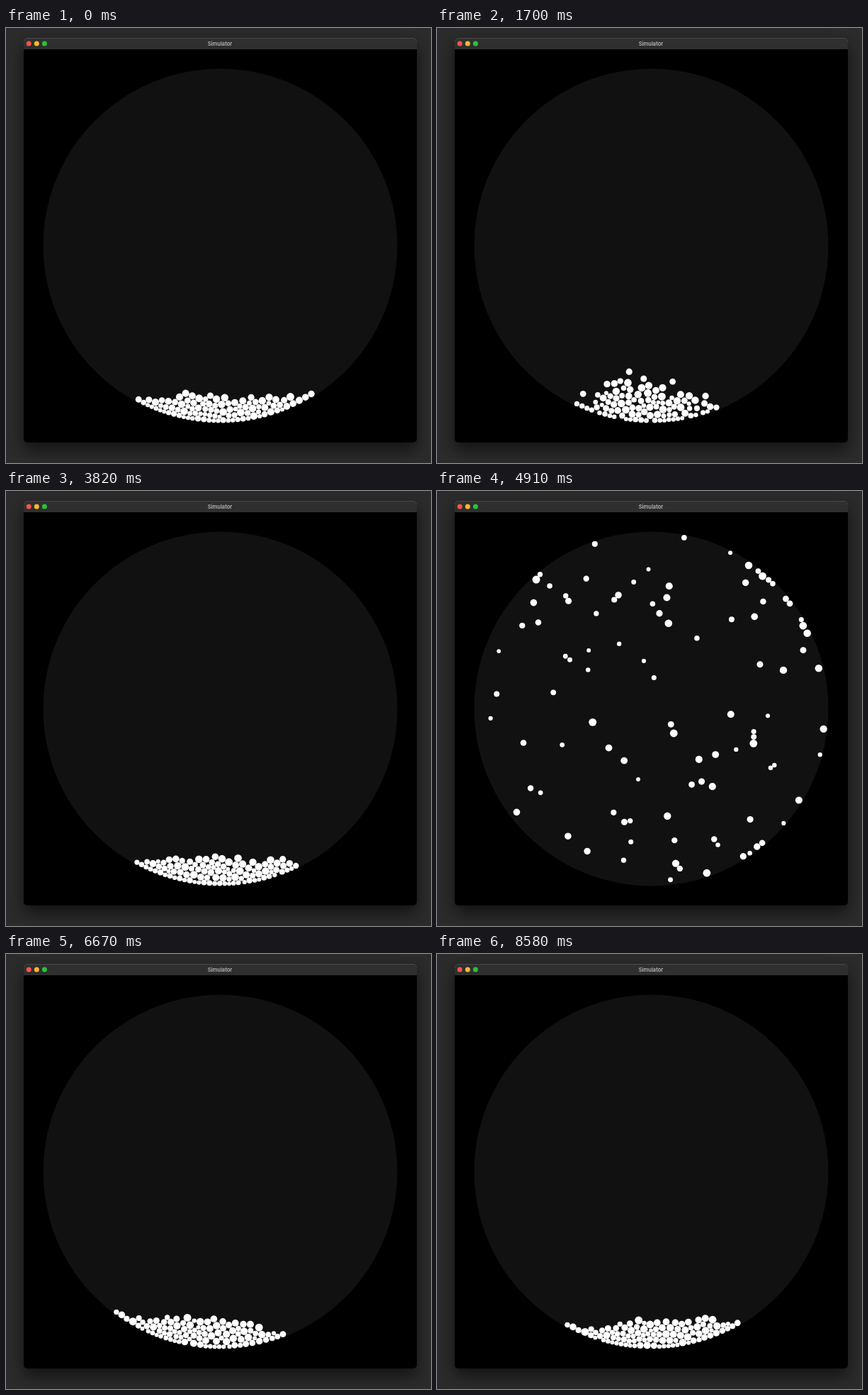
An HTML page for the animation above (8610 ms loop, 600 px wide and 614 px high).

```html
<!DOCTYPE html>
<html lang="en">
<head>
<meta charset="utf-8">
<title>Simulator</title>
<style>
  html, body { margin: 0; width: 100%; height: 100%; overflow: hidden; background: #2b2b2b; }
  svg { display: block; width: 100vw; height: 100vh; }
  text { font: 600 7.5px Inter, "Liberation Sans", sans-serif; fill: #b8b8b8; text-anchor: middle; }
</style>
</head>
<body>
<svg viewBox="0 0 600 614">
  <defs>
    <filter id="shadow" x="-10%" y="-10%" width="120%" height="120%">
      <feDropShadow dx="0" dy="10" stdDeviation="11" flood-color="#000" flood-opacity=".6"/>
    </filter>
  </defs>
  <rect width="600" height="614" fill="#2b2b2b"/>
  <rect x="25" y="14" width="555" height="571" rx="5" fill="#000" filter="url(#shadow)"/>
  <path d="M25 30V19a5 5 0 0 1 5-5H575a5 5 0 0 1 5 5V30Z" fill="#2f2f2f"/>
  <path d="M25.5 19a4.5 4.5 0 0 1 4.5-4.5H575a4.5 4.5 0 0 1 4.5 4.5" fill="none" stroke="#505050" stroke-width=".8"/>
  <circle cx="32.2" cy="22" r="3.5" fill="#f8544c"/>
  <circle cx="43.3" cy="22" r="3.5" fill="#fbb92f"/>
  <circle cx="54.4" cy="22" r="3.5" fill="#28c23c"/>
  <text x="302" y="24.6">Simulator</text>
  <circle cx="302.5" cy="307.5" r="250" fill="#111"/>
  <g id="balls" fill="#fff"></g>
</svg>
<script>
const LOOP = 8610, FRAMES = 284, FRAME = LOOP / FRAMES;
const SUBSTEPS = 16, DT = FRAME / 1000 / SUBSTEPS;
const CX = 302.5, CY = 307.5, R = 250;
const GRAVITY = 1150, DRAG = 0.9995;
const COUNT = 100, SPREAD = 530, KICK = 150;
const SETTLE_FRAMES = 130, FIRST_BURST = 23, SECOND_BURST = 162;

let seed = 20;
function random() {
  seed = (seed * 1664525 + 1013904223) % 4294967296;
  return seed / 4294967296;
}

const balls = Array.from({ length: COUNT }, (_, i) => ({
  r: 5.5 - 2.6 * i / (COUNT - 1), x: 0, y: 0, oldX: 0, oldY: 0
}));

function keepInside(ball) {
  const dx = ball.x - CX, dy = ball.y - CY;
  const dist = Math.hypot(dx, dy), limit = R - ball.r;
  if (dist <= limit) return;
  ball.x = CX + dx * limit / dist;
  ball.y = CY + dy * limit / dist;
}

function separate() {
  for (let i = 0; i < COUNT; i++) {
    const a = balls[i];
    for (let j = i + 1; j < COUNT; j++) {
      const b = balls[j], reach = a.r + b.r, dy = a.y - b.y;
      if (dy > reach || dy < -reach) continue;
      const dx = a.x - b.x, square = dx * dx + dy * dy;
      if (square >= reach * reach || square === 0) continue;
      const dist = Math.sqrt(square), push = (reach - dist) / dist / 2;
      a.x += dx * push;
      a.y += dy * push;
      b.x -= dx * push;
      b.y -= dy * push;
    }
  }
}

function step() {
  for (const ball of balls) {
    const vx = (ball.x - ball.oldX) * DRAG, vy = (ball.y - ball.oldY) * DRAG;
    ball.oldX = ball.x;
    ball.oldY = ball.y;
    ball.x += vx;
    ball.y += vy + GRAVITY * DT * DT;
  }
  separate();
  balls.forEach(keepInside);
}

function advance() {
  for (let i = 0; i < SUBSTEPS; i++) step();
}

// Scatter the balls at random; those that overlap push each other away
function burst() {
  for (const ball of balls) {
    ball.x = CX + (random() - 0.5) * SPREAD;
    ball.y = CY + (random() - 0.5) * SPREAD;
    keepInside(ball);
    ball.oldX = ball.x;
    ball.oldY = ball.y;
  }
  for (let i = 0; i < 12; i++) {
    separate();
    balls.forEach(keepInside);
  }
  for (const ball of balls) {
    ball.oldX = ball.x - (ball.x - ball.oldX) * KICK * DT;
    ball.oldY = ball.y - (ball.y - ball.oldY) * KICK * DT;
  }
}

function simulate() {
  burst();
  for (let i = 0; i < SETTLE_FRAMES; i++) advance();
  return Array.from({ length: FRAMES }, (_, i) => {
    if (i === FIRST_BURST || i === SECOND_BURST) burst();
    else advance();
    return balls.map(({ x, y }) => ({ x, y }));
  });
}

const start = performance.now();
const poses = simulate();
const group = document.getElementById("balls");
const dots = balls.map(ball => {
  const dot = document.createElementNS("http://www.w3.org/2000/svg", "circle");
  dot.setAttribute("r", ball.r.toFixed(2));
  return group.appendChild(dot);
});

function draw(time) {
  const pose = poses[Math.floor(time / FRAME + 0.1) % FRAMES];
  dots.forEach((dot, i) => {
    dot.setAttribute("cx", pose[i].x.toFixed(2));
    dot.setAttribute("cy", pose[i].y.toFixed(2));
  });
}

function tick() {
  draw((performance.now() - start) % LOOP);
  requestAnimationFrame(tick);
}
draw(0);
requestAnimationFrame(tick);
</script>
</body>
</html>
```
